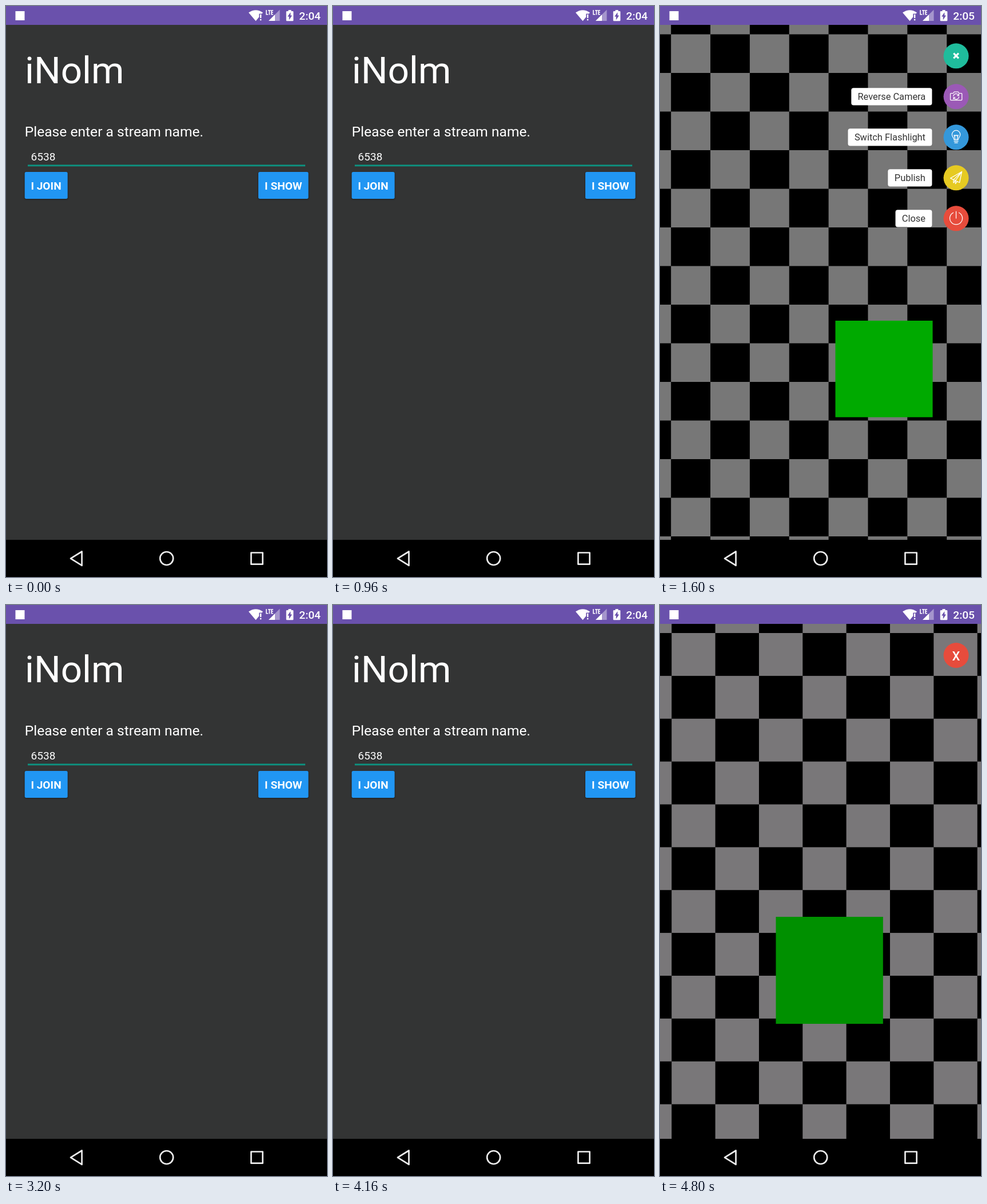
Recreate the animation shown at these times as an HTML page. Size 561x998 px, loop 6.4 s.

```html
<!DOCTYPE html>
<html lang="en">
<head>
<meta charset="utf-8">
<title>Stream demo</title>
<style>
  html, body { margin: 0; width: 100%; height: 100%; overflow: hidden; background: #000; }
  svg { display: block; width: 561px; height: 998px; font-family: Roboto, sans-serif; fill: #fff; }
  .line { fill: none; stroke: #fff; stroke-width: 1.25; stroke-linecap: round; stroke-linejoin: round; }
  .nav { fill: none; stroke: #ececec; stroke-width: 2.7; stroke-linejoin: round; }
  .button { fill: #2196f3; filter: drop-shadow(0 1.5px 1.5px #0007); }
  .caption { font-size: 19.1px; font-weight: 700; text-anchor: middle; }
</style>
</head>
<body>
<svg viewBox="0 0 561 998">
  <g id="form">
    <rect y="33" width="561" height="900" fill="#333434"/>
    <text x="33" y="135" font-size="65.5">iNolm</text>
    <text x="32.7" y="228" font-size="24.6">Please enter a stream name.</text>
    <text x="43.6" y="270" font-size="19.1">6538</text>
    <rect x="38" y="277.4" width="485" height="2.9" fill="#0d9280"/>
    <rect class="button" x="32.7" y="290" width="75" height="47" rx="2.7"/>
    <rect class="button" x="441" y="290" width="87.5" height="47" rx="2.7"/>
    <text class="caption" x="70" y="321">I JOIN</text>
    <text class="caption" x="484.8" y="321">I SHOW</text>
  </g>

  <g id="host">
    <g id="hostBoard"></g>
    <g id="menu"></g>
    <g class="line">
      <path d="M513.2 82.7l8.6 8.6m0-8.6l-8.6 8.6" stroke-width="3.2" stroke-linecap="butt"/>
      <path d="M508.5 152.5h4l1.6-2.5h7l1.6 2.5h4q1 0 1 1v10q0 1-1 1h-18.200q-1 0-1-1v-10q0-1 1-1z
        M512.800 157.500a4.800 4.800 0 0 1 9-1.500m.4-2.200v2.800h-2.800M522.400 159a4.800 4.800 0 0 1-9 1.500m-.4 2.200v-2.800h2.800"/>
      <path d="M514 234c0-4-3.700-5-3.700-9.300a7.200 7.200 0 0 1 14.400 0c0 4.300-3.700 5.300-3.700 9.300z
        M514 236.600h7M515 239.200h5M516 233.500l-2-8 2 1.500 1.500-1.500 1.500 1.500 2-1.500-2 8"/>
      <path d="M507.500 301l20-11.500-4 19-7.200-3.300zM527.500 289.500l-11.200 15.700v5.500l3.400-4M507.500 301l5.400 2.600 14.600-14.100M512.900 303.600v5.400l3.400-3.500"/>
      <path d="M512.500 361.200a11 11 0 1 0 10 0M517.500 359v12"/>
    </g>
  </g>

  <g id="guest">
    <g id="guestBoard"></g>
    <circle cx="517.5" cy="88" r="22" fill="#e74c3c"/>
    <text x="517.5" y="97" font-size="21.8" font-weight="500" text-anchor="middle">X</text>
  </g>

  <rect width="561" height="33" fill="#6a51ac"/>
  <rect x="16.500" y="9" width="16" height="16"/>
  <path d="M424 11.500Q436.500 3 449 11.500L447.300 13.600H442.300V19.300L436.500 26.300z"/>
  <path d="M443.900 14.800h2.400v6.200h-2.400zM443.900 22.800h2.400v2.500h-2.400z"/>
  <path class="line" style="stroke-width:1.6;stroke-linecap:butt;stroke-linejoin:miter"
    d="M455 7v7.700h3.200M458 7.800h4.800M460.400 7v8.500M467 7.800h-2.900v6.900h2.900M464 11.200h2.600"/>
  <path d="M478.500 6.500V26H459z" opacity=".4"/>
  <path d="M470 15V26H459z"/>
  <path d="M493.500 7h5v2h2.500q1.300 0 1.300 1.300v14.700q0 1.300-1.300 1.300h-10q-1.300 0-1.300-1.300v-14.700q0-1.300 1.300-1.300h2.500z"/>
  <path d="M497.300 11v5.500h2.700l-5.300 8v-6h-2.700z" fill="#6a51ac"/>
  <text id="clock" x="512.300" y="24" font-size="19.1" font-weight="500"></text>

  <rect y="933" width="561" height="65" fill="#000"/>
  <g class="nav">
    <path d="M113 965.700l19.600-12.200v24.400z"/>
    <circle cx="280.700" cy="965.500" r="11.500"/>
    <rect x="428.400" y="955.500" width="20.200" height="20.200"/>
  </g>
</svg>
<script>
const get = id => document.getElementById(id);
const rect = (x, y, w, h, fill, rx = 0) =>
  `<rect x="${x}" y="${y}" width="${w}" height="${h}" fill="${fill}" rx="${rx}"/>`;

// Checkerboard whose grey cell at (x, y) fixes the grid
function board(id, x, y, w, h, grey, block) {
  let out = rect(0, 33, 561, 900, '#000');
  for (let r = -1; y + r * h < 933; r++)
    for (let c = -1; x + c * w < 561; c++)
      if ((r + c) % 2 === 0) out += rect(x + c * w, y + r * h, w, h, grey);
  get(id).innerHTML = out + block;
}
board('hostBoard', 19.2, 49.5, 68.85, 67.5, '#777', rect(306.5, 550, 170, 168.7, '#0a0'));
board('guestBoard', 20.3, 49, 76.33, 74.87, '#797779', rect(202.5, 545, 187.3, 187, '#009000'));

const items = [
  ['#1fbc9c'],
  ['#9b59b6', 'Reverse Camera', 334.3],
  ['#3498db', 'Switch Flashlight', 328.5],
  ['#e6ca22', 'Publish', 398.3],
  ['#e74c3c', 'Close', 411.5]
];
get('menu').innerHTML = items.map(([color, label, x], i) => {
  const y = 87.3 + i * 71;
  const tag = label ? rect(x, y - 15, 475.4 - x, 30.3, '#fff', 4) +
    `<text x="${(x + 475.4) / 2}" y="${y + 6}" font-size="16.4" fill="#333" text-anchor="middle">${label}</text>` : '';
  return `<circle cx="517.5" cy="${y}" r="22" fill="${color}"/>${tag}`;
}).join('');

const scenes = ['form', 'host', 'form', 'guest'];
function draw() {
  const scene = scenes[Math.floor(performance.now() / 1600) % 4];
  for (const id of ['form', 'host', 'guest'])
    get(id).style.display = id === scene ? '' : 'none';
  get('clock').textContent = scene === 'form' ? '2:04' : '2:05';
  requestAnimationFrame(draw);
}
draw();
</script>
</body>
</html>
```
